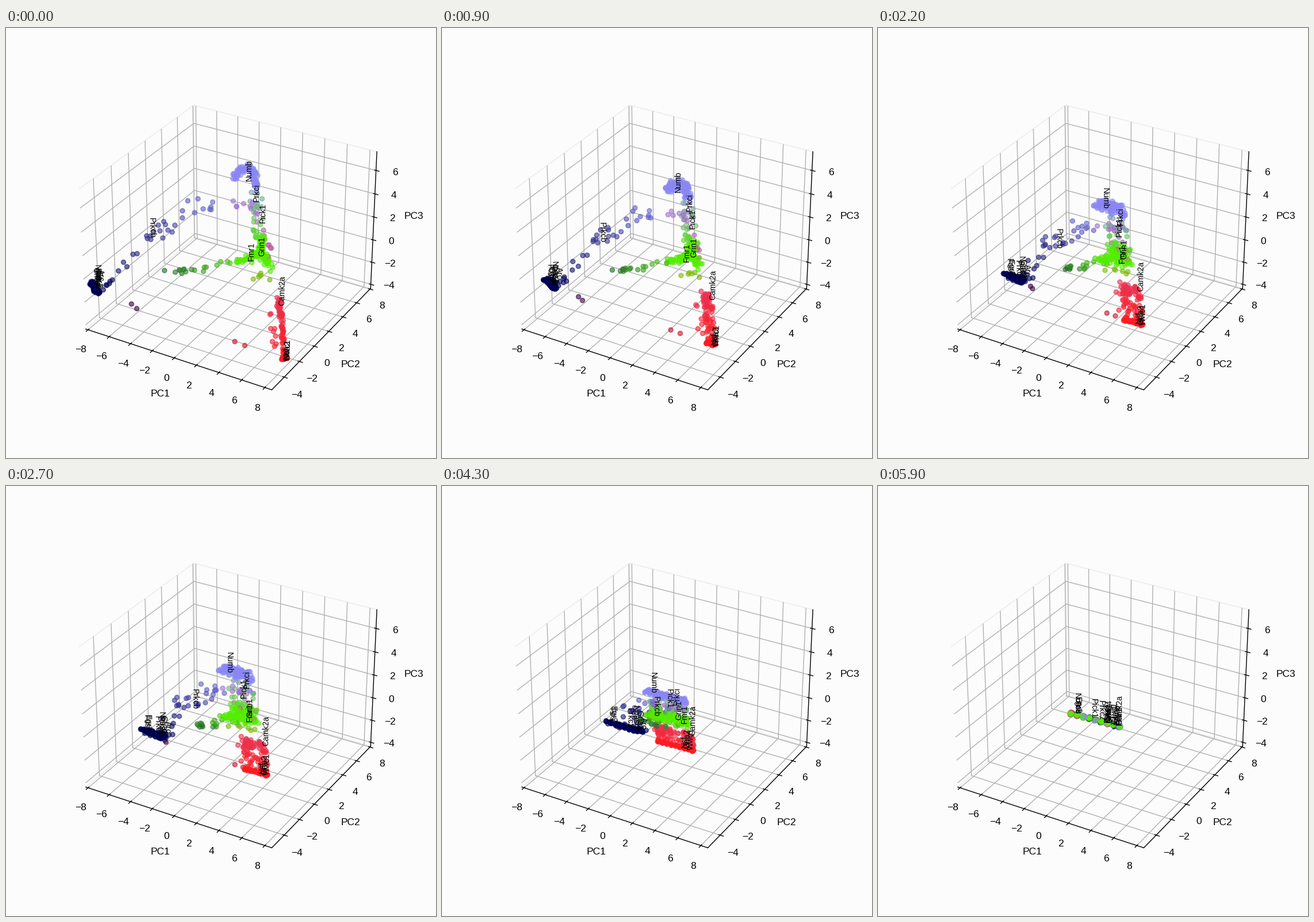
A matplotlib script for the animation above (6 s loop, 748 by 748 pixels).

```python
import numpy as np
import matplotlib.pyplot as plt
from matplotlib.animation import FuncAnimation

SIZE, DPI, FRAMES = 748, 125, 60
BG = "#fcfcfc"
CENTER_X, VANISH_Y = 391, 5762  # where the vertical lines converge
STEPS = 8                       # the points gather in clumps on the final line
plt.rcParams.update({"font.family": "Liberation Sans", "font.size": 10})
rng = np.random.default_rng(11)

# Cluster hubs: stage position and colour
HUBS = {
    "navy": ((153, 447), (0.0, 0.0, 0.32)),
    "lavender": ((415, 250), (0.54, 0.53, 0.96)),
    "green": ((432, 393), (0.33, 0.93, 0.0)),
    "red": ((483, 565), (1.0, 0.1, 0.13)),
    "rose": ((474, 475), (0.92, 0.2, 0.32)),
}

# Hub colours blended, point count, spread, key points of the path
STRANDS = [
    ("navy", "navy", 95, 2.4, [(149, 444), (154, 450), (160, 460)]),
    ("navy", "lavender", 34, 6, [(168, 452), (242, 370), (322, 316), (375, 300)]),
    ("navy", "green", 18, 4, [(275, 415), (310, 424), (408, 406)]),
    ("navy", "red", 2, 2, [(218, 478), (234, 491)]),
    ("navy", "red", 2, 2, [(385, 544), (424, 553)]),
    ("red", "green", 6, 4, [(434, 433), (455, 436), (461, 455)]),
    ("lavender", "red", 20, 7, [(402, 308), (432, 312), (444, 350), (460, 405)]),
    ("lavender", "green", 28, 6, [(434, 283), (438, 330), (442, 368)]),
    ("red", "rose", 9, 4, [(464, 484), (468, 553)]),
    ("lavender", "lavender", 100, 2.6,
     [(396, 264), (408, 247), (426, 243), (433, 260), (435, 283)]),
    ("green", "green", 26, 1.3, [(398, 409), (418, 402), (438, 395)]),
    ("green", "green", 55, 4, [(443, 366), (445, 392), (460, 414)]),
    ("green", "green", 25, 5, [(428, 398), (446, 390)]),
    ("red", "rose", 74, 1.6, [(474, 470), (479, 503), (484, 572)]),
    ("red", "red", 50, 1.4, [(481, 574), (486, 574)]),
]

# Label, its anchor at the start, its place along the final line
LABELS = [
    ("Numb", (416, 266), 0.04), ("Prkci", (429, 302), 0.67),
    ("Pick1", (440, 339), 0.38), ("Grin1", (438, 397), 0.68),
    ("Fmr1", (420, 405), 0.92), ("Camk2a", (473, 483), 0.92),
    ("Prkcb", (246, 366), 0.87), ("Wwc1", (483, 579), 0.82),
    ("Gria2", (482, 578), 0.71), ("Nsf", (481, 576), 0.64),
    ("Fos", (151, 441), 0.04), ("Egr2", (153, 454), 0.05),
    ("Prkcz", (150, 457), 0.54), ("Npas4", (151, 452), 0.70),
    ("Gria1", (148, 450), 0.83), ("Arc", (157, 441), 0.91),
]


def trail(knots, n, spread):
    """Scatter n points along a polyline."""
    u = rng.uniform(0, len(knots) - 1, n)
    line = [np.interp(u, range(len(knots)), axis) for axis in zip(*knots)]
    return np.column_stack(line) + rng.normal(0, spread, (n, 2))


def blend(points, a, b):
    """Colour points by their place between hubs a and b."""
    (pa, ca), (pb, cb) = HUBS[a], HUBS[b]
    axis = np.subtract(pb, pa)
    mix = np.clip((points - pa) @ axis / max(axis @ axis, 1), 0, 1)
    return np.outer(1 - mix, ca) + np.outer(mix, cb)


def final_line(s):
    return np.stack([336 + 84 * s, 396 + 22 * s], axis=-1)


paths = [trail(knots, n, spread) for _, _, n, spread, knots in STRANDS]
start = np.concatenate(paths)
color = np.concatenate([blend(p, s[0], s[1]) for p, s in zip(paths, STRANDS)])
order = np.argsort(0.4 * color[:, 1] + rng.random(len(color)))
start, color = start[order], color[order]
clump = np.round(rng.beta(0.8, 0.7, len(start)) * STEPS) / STEPS
end = final_line(clump) + rng.normal(0, 1, start.shape)

fig = plt.figure(figsize=(SIZE / DPI, SIZE / DPI), dpi=DPI, facecolor=BG)
ax = fig.add_subplot(projection="3d")
ax.set_facecolor(BG)
ax.set(xlim=(-8.21, 8.6), ylim=(-5.58, 8.1), zlim=(-4.37, 7.58),
       xlabel="PC1", ylabel="PC2", zlabel="PC3")
ax.set_xticks(range(-8, 9, 2))
ax.set_yticks(range(-4, 9, 2))
ax.set_zticks(range(-4, 7, 2))
for axis in (ax.xaxis, ax.yaxis, ax.zaxis):
    axis.pane.fill = False
    axis.pane.set_edgecolor((0.88, 0.88, 0.88))

# Points and labels live on a layer measured in stage pixels
layer = fig.add_axes([0, 0, 1, 1], zorder=5)
layer.axis("off")
layer.set(xlim=(0, SIZE), ylim=(SIZE, 0))
dots = layer.scatter(*start.T, s=20, c=color, alpha=0.6, linewidths=1)
texts = [layer.text(*a, name, size=8, ha="left", va="bottom", zorder=6)
         for name, a, _ in LABELS]


def upright(x, y):
    """Text angle along the vertical axis in perspective, kept readable."""
    lean = np.degrees(np.arctan((x - CENTER_X) / (VANISH_Y - y)))
    return 90 - lean if lean >= 0 else -90 - lean


def update(i):
    p = i / (FRAMES - 1)
    dots.set_offsets(start + (end - start) * p)
    for text, (_, a, s) in zip(texts, LABELS):
        x, y = a + (final_line(s) - a) * p
        text.set_position((x, y))
        text.set_rotation(upright(x, y))
    return [dots, *texts]


anim = FuncAnimation(fig, update, frames=FRAMES, interval=100, repeat=True, repeat_delay=0)
plt.show()
```
